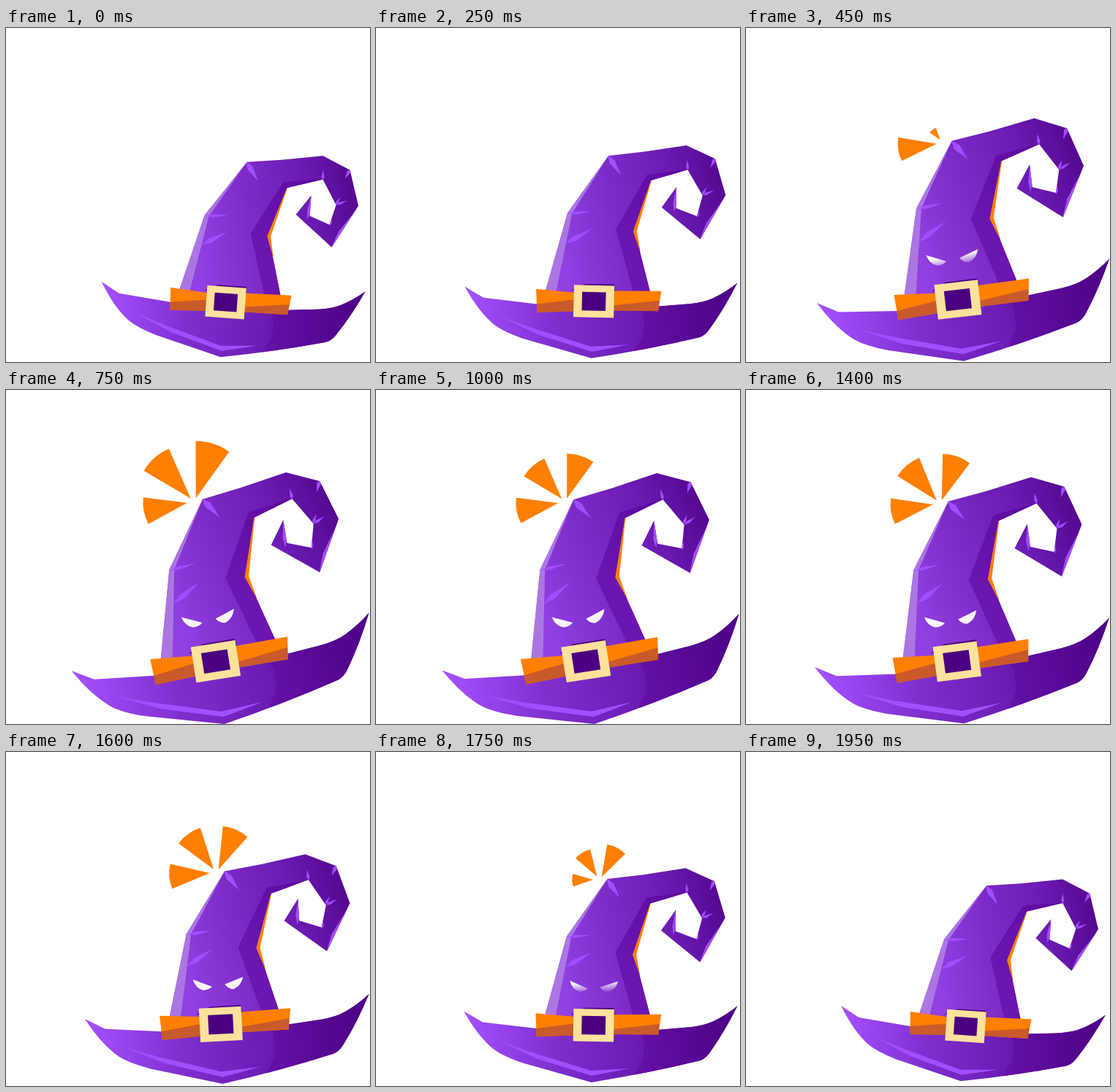
Animation, 498 px wide and 458 px high, one loop 2000 ms. Source, as an HTML page with a canvas:

```html
<!DOCTYPE html>
<html lang="en">
<head>
<meta charset="utf-8">
<title>Witch hat</title>
<style>
html, body { margin: 0; width: 100%; height: 100%; overflow: hidden; background: #fff; }
canvas { display: block; }
</style>
</head>
<body>
<canvas id="stage" width="498" height="458"></canvas>
<script>
const ctx = document.getElementById('stage').getContext('2d');
const LOOP = 2000, STEP = 50, RAD = Math.PI / 180;
const ORANGE = '#ff7f00', RUST = '#c95a2b', GLOW = '#a24dff', DEEP = '#4b0082', EYE = '#f7f5fa';

const clamp = v => Math.max(0, Math.min(1, v));
const ease = (t, a, b) => (1 - Math.cos(Math.PI * clamp((t - a) / (b - a)))) / 2;

// Lean of the hat: up with a slight overshoot, hold, back down
const lean = t => .98 * (ease(t, 100, 580) - ease(t, 1250, 2000))
  + .02 * Math.sin(Math.PI * clamp((t - 500) / 500));

// Underdamped step response
function spring(x) {
  if (x <= 0) return 0;
  const decay = .0048, w = Math.PI / 300;
  return 1 - Math.exp(-decay * x) * (Math.cos(w * x) + decay / w * Math.sin(w * x));
}

function shade(x0, y0, x1, y1, ...colors) {
  const g = ctx.createLinearGradient(x0, y0, x1, y1);
  colors.forEach((c, i) => g.addColorStop(i / (colors.length - 1), c));
  return g;
}

function poly(fill, ...p) {
  ctx.fillStyle = fill;
  ctx.beginPath();
  for (let i = 0; i < p.length; i += 2) ctx.lineTo(p[i], p[i + 1]);
  ctx.fill();
}

function path(fill, d) {
  ctx.fillStyle = fill;
  ctx.fill(new Path2D(d));
}

// Thin diamond-shaped crease of light
function streak(x0, y0, x1, y1, w) {
  const len = Math.hypot(x1 - x0, y1 - y0);
  const nx = (y1 - y0) / len * w / 2, ny = (x0 - x1) / len * w / 2;
  const mx = x0 + (x1 - x0) * .35, my = y0 + (y1 - y0) * .35;
  poly(GLOW, x0, y0, mx + nx, my + ny, x1, y1, mx - nx, my - ny);
}

function inside(outline, paint) {
  ctx.save();
  ctx.clip(new Path2D(outline));
  paint();
  ctx.restore();
}

function drawRays(t) {
  ctx.fillStyle = ORANGE;
  [[311, 184], [316.5, 180], [322.5, 181]].forEach(([x, y], i) => {
    const size = spring(t - 275 - 100 * i) * (1 - ease(t, 1640 + 20 * i, 1870 + 20 * i));
    if (size < .01) return;
    const mid = 182.3 + 59.3 * i, half = 17.9;
    ctx.beginPath();
    ctx.moveTo(x, y);
    ctx.arc(x, y, (i ? 55.5 : 51.5) * size, (mid - half) * RAD, (mid + half) * RAD);
    ctx.fill();
  });
}

function drawBrim() {
  const outline = 'M131 348 L155 364 L225 376 L388 387 L428 386 Q447 385 459 380 Q476 373 492 361.5'
    + ' Q473 395 452 421 Q446 429 438 431 Q368 444 294 451.5 L205 421 Q180 411 168 401 Q148 383 131 348 Z';
  path(shade(135, 380, 470, 400, '#a44fff', '#802fce', '#691bb2', '#52048a'), outline);
  inside(outline, () => poly(shade(355, 400, 470, 400, '#6411a6', '#50038a'),
    363, 380, 366, 403, 364, 425, 351, 444, 351, 458, 498, 458, 498, 350));
  poly(GLOW, 175, 389.5, 219, 408, 294, 436, 344, 436, 295, 443, 224, 416.5);
}

function drawCone() {
  poly(ORANGE, 386, 218, 362.5, 286, 366, 314, 350, 300, 378, 217);
  const outline = 'M236 364 L272 257 L330 184 L378 181 L434 175.5 L471 195 L482.5 244 L446 301 L397 256'
    + ' L418 230 L416 258 L443 270 L452 243 L434 208 L384.5 219.5 L357.5 286 L365 312 L377 372 L300 380 Z';
  path(shade(255, 270, 485, 235, '#9140e2', '#7d2cc8', '#6c1cb4', '#54078f'), outline);
  inside(outline, () => {
    poly(shade(335, 290, 435, 210, '#6c16b2', '#5b0a9e'),
      434, 207.5, 380, 211.5, 335, 282, 355, 372, 380, 372, 368, 290, 390, 220);
    poly('#ab76e2', 236, 364, 272, 257, 330, 184, 278, 258, 251, 364);
    streak(273, 258, 304, 257, 4.5);
    streak(267, 298, 303, 280, 7);
    streak(329, 183, 345, 210, 8);
    streak(434, 209, 434, 195, 4);
    streak(472, 193, 464, 207, 5);
    streak(451, 243, 458, 232, 3.5);
    streak(452, 243, 467, 237, 3.5);
    streak(413, 263, 418, 230, 5);
    streak(443, 272, 446, 260, 4);
    streak(445, 302, 483, 245, 8);
  });
}

function drawEyes(t) {
  const open = ease(t, 300, 520) * (1 - ease(t, 1680, 1860));
  if (open < .01) return;
  const edge = 308 + open * 30;
  const fill = open > .99 ? EYE : shade(0, edge - 8, 0, edge + 6, EYE, 'rgba(247,245,250,0)');
  path(fill, 'M273 315.5 L296 327.5 Q291 331.5 284 330.5 Q275 327 273 315.5 Z');
  path(fill, 'M336.5 320 L312.5 326.5 Q316 333 322.5 334 Q333 331 336.5 320 Z');
}

function drawBand() {
  poly(DEEP, 272, 360, 290, 352.5, 329, 355, 330, 368);
  poly(ORANGE, 225.5, 356, 280, 364, 280, 388, 225, 387);
  poly(RUST, 225, 376, 280, 372.5, 280, 388.5, 225, 387);
  poly(ORANGE, 322, 363.5, 391, 367, 385.5, 393.5, 322, 389);
  poly(RUST, 322, 383, 388, 379.5, 385.5, 393.5, 322, 389.5);
  ctx.save();
  ctx.translate(301, 376.3);
  ctx.rotate(4.2 * RAD);
  for (const [color, w, h] of [['#fbe19c', 53.5, 42.8], [DEEP, 31.5, 24.5]]) {
    ctx.fillStyle = color;
    ctx.fillRect(-w / 2, -h / 2, w, h);
  }
  ctx.restore();
}

function draw(t) {
  const p = lean(t), size = 1 + .148 * p;
  ctx.setTransform(1, 0, 0, 1, 0, 0);
  ctx.fillStyle = '#fff';
  ctx.fillRect(0, 0, 498, 458);
  ctx.translate(293.6 + 5.1 * p, 450.8 + 6.7 * p);
  ctx.rotate(-13.2 * RAD * p);
  ctx.scale(size, size);
  ctx.translate(-294, -451);
  drawRays(t);
  drawBrim();
  drawCone();
  drawEyes(t);
  drawBand();
}

const start = performance.now();
function tick() {
  const t = Math.max(0, performance.now() - start) % LOOP;
  draw(Math.floor(t / STEP) * STEP);
  requestAnimationFrame(tick);
}
tick();
</script>
</body>
</html>
```
